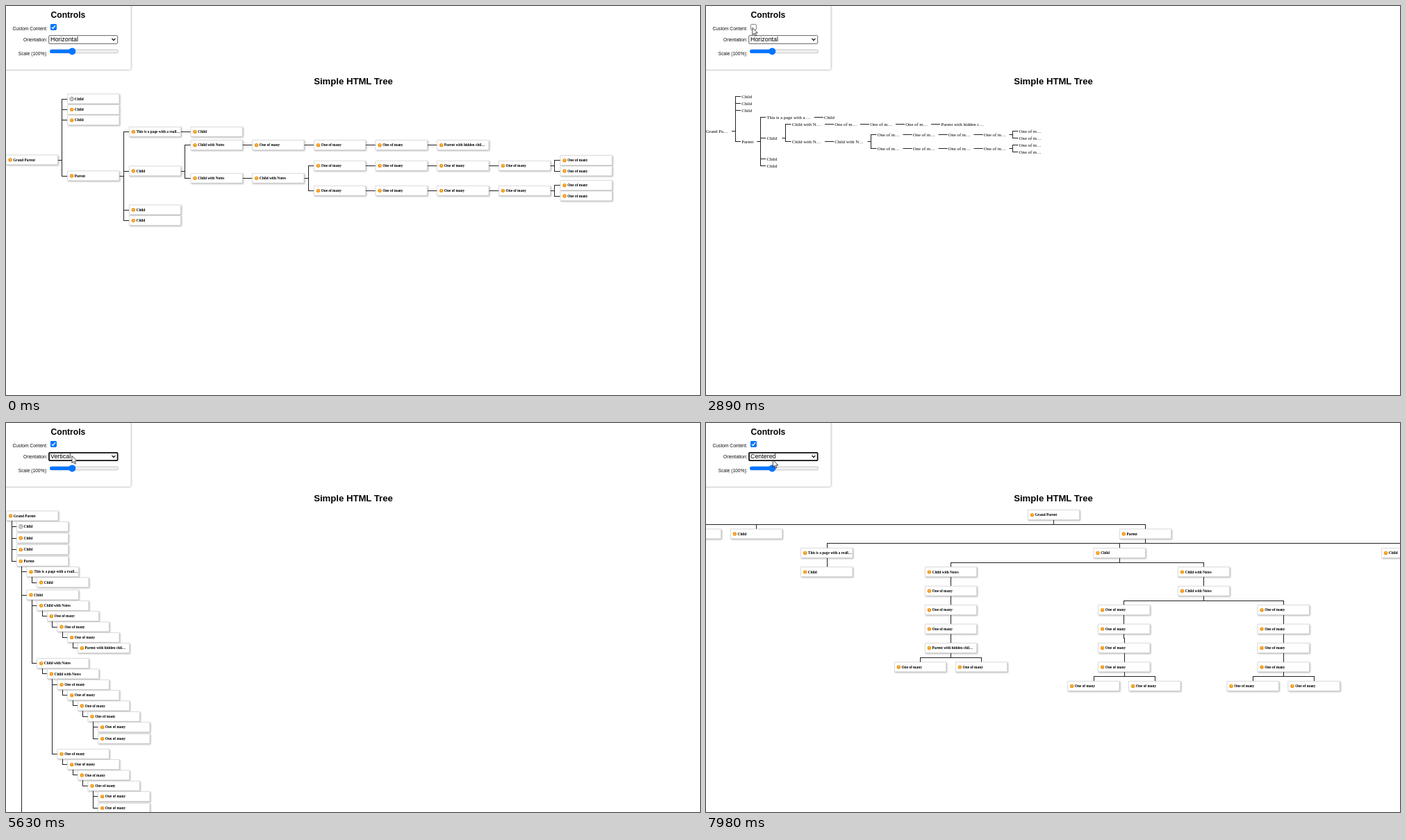
Recreate the animation shown at these times as an HTML page. Size 999 px wide and 561 px high, loop 8000 ms.

```html
<!DOCTYPE html>
<html lang="en">
<head>
<meta charset="utf-8">
<title>Simple HTML Tree</title>
<style>
  html, body { margin: 0; width: 100%; height: 100%; overflow: hidden; background: #fff; }
  svg { display: block; width: 999px; height: 561px; font-family: "Liberation Sans", Arial, sans-serif; }
  .tree { font-family: "Liberation Serif", Times, serif; }
  .tree .lines { fill: none; stroke: #222; stroke-width: 1; }
  .cards { fill: #fff; stroke: #d4d4d4; stroke-width: .7; filter: drop-shadow(1.8px 1.8px 1.3px rgba(0, 0, 0, .32)); }
  .boxed text { font-size: 5.33px; font-weight: bold; }
  .plain text { font-size: 6.67px; }
  .boxed .mark { font: bold 4px "Liberation Sans", Arial, sans-serif; text-anchor: middle; fill: #ffe9c4; }
  .boxed .help .mark { fill: #333; }
  .dot { fill: #f2960f; }
  .help .dot { fill: #fff; stroke: #444; stroke-width: .7; }
  .panel { fill: #fff; filter: drop-shadow(0 .7px 1.4px rgba(0, 0, 0, .45)); }
  .label { font-size: 6.67px; text-anchor: end; fill: #111; }
  .head { font-weight: bold; text-anchor: middle; }
  .field { font-size: 8.9px; }
  .pick rect { fill: #1967d2; }
  .pick text { fill: #fff; }
  #cursor { animation: move 8s infinite; }
  @keyframes move {
    0%, 4.25% { transform: translate(863px, 516px); animation-timing-function: cubic-bezier(.4, 0, .3, 1); }
    14.125%, 14.75% { transform: translate(70px, 34px); }
    17.625%, 39.625% { transform: translate(66.5px, 31px); }
    41.875%, 55.25% { transform: translate(97px, 48.5px); }
    57.5%, 66.1% { transform: translate(97px, 71.5px); }
    70.375%, 79.625% { transform: translate(94.5px, 47px); }
    83.5%, 94% { transform: translate(97px, 80px); }
    99.75%, 100% { transform: translate(96px, 53px); }
  }
</style>
</head>
<body>
<svg viewBox="0 0 999 561">
  <g id="trees"></g>
  <text class="head" x="500" y="112.7" font-size="13.15">Simple HTML Tree</text>

  <rect class="panel" x="-4" y="-4" width="183.7" height="95.7" rx="2"/>
  <text class="head" x="89.4" y="17.4" font-size="12.1">Controls</text>
  <text class="label" x="59.5" y="34.8">Custom Content:</text>
  <text class="label" x="59.5" y="51.3">Orientation:</text>
  <text class="label" x="59.5" y="71">Scale (100%):</text>

  <rect id="empty" x="64.4" y="26.4" width="8" height="8" rx="1.4" fill="#fff" stroke="#666" stroke-width=".8"/>
  <g id="checked">
    <rect x="64" y="26" width="8.8" height="8.8" rx="1.4" fill="#0075ff"/>
    <rect id="hover" x="64" y="26" width="8.8" height="8.8" rx="1.4" fill="#005cc8"/>
    <rect id="press" x="64" y="26" width="8.8" height="8.8" rx="1.4" fill="#3793ff"/>
    <path d="M65.8 30.6l1.8 1.9 3.4-4.3" fill="none" stroke="#fff" stroke-width="1.3"/>
  </g>

  <rect x="61.7" y="42.6" width="99" height="11.8" rx="1.2" fill="#fff" stroke="#555" stroke-width=".9"/>
  <rect id="ring" x="62" y="42.9" width="98.6" height="11.2" rx="1.2" fill="none" stroke="#101010" stroke-width="1.7"/>
  <path d="M152.4 46.9l2.5 2.6 2.5-2.6" fill="none" stroke="#111" stroke-width="1.3"/>
  <g class="field" id="values"></g>

  <rect x="63.4" y="63" width="98.2" height="4.8" rx="2.4" fill="#efefef" stroke="#b2b2b2" stroke-width=".7"/>
  <rect x="63" y="62.7" width="34" height="5.4" rx="2.7" fill="#0075ff"/>
  <circle cx="95.3" cy="65.4" r="5" fill="#0075ff"/>

  <g id="popup" class="field">
    <rect x="61.6" y="55" width="99.3" height="34.3" fill="#fff" stroke="#555" stroke-width=".9"/>
    <g id="options"></g>
  </g>

  <g id="cursor">
    <path d="M.3 .3V10.7L2.7 8.5 4.3 12.2 6 11.4 4.4 7.9H7.8Z" fill="#fff" stroke="#111" stroke-width=".8"/>
  </g>
</svg>

<script>
const $ = id => document.getElementById(id);
const LOOP = 8000;
const STEP = 44 / 3;          // indent and gap unit
const CARD = 74.67;

// Short form and column advance used by the plain view.
const plainForm = {
  'Grand Parent': ['Grand Pa…', 51.3],
  'Parent': ['Parent', 36.2],
  'Child': ['Child', 36.3],
  'This is a page with a reall…': ['This is a page with a …', 82.5],
  'Child with Notes': ['Child with N…', 61.5],
  'One of many': ['One of m…', 51],
  'Parent with hidden chil…': ['Parent with hidden c…', 60]
};

const node = (label, ...kids) => ({ label, kids });
const one = (...kids) => node('One of many', ...kids);
const child = (...kids) => node('Child', ...kids);
const notes = (...kids) => node('Child with Notes', ...kids);
const branch = () => one(one(one(one(one(), one()))));

function makeTree(showHidden) {
  const secret = showHidden ? [one(), one()] : [];
  return node('Grand Parent',
    { ...child(), help: true }, child(), child(),
    node('Parent',
      node('This is a page with a reall…', child()),
      child(
        notes(one(one(one(node('Parent with hidden chil…', ...secret))))),
        notes(notes(branch(), branch()))),
      child(), child()));
}

function walk(n, visit, depth = 0) {
  visit(n, depth);
  n.kids.forEach(k => walk(k, visit, depth + 1));
}

// Centres every node within the space taken by its subtree.
function spread(n, start, leaf, pad) {
  let end = start + pad / 2;
  n.kids.forEach(k => end += spread(k, end, leaf, pad));
  const size = n.kids.length ? end - start + pad / 2 : leaf;
  n.mid = start + size / 2;
  return size;
}

const snap = v => Math.floor(v) + .5;
const hLine = (x1, x2, y) => `M${x1} ${snap(y)}H${x2}`;
const vLine = (x, y1, y2) => `M${snap(x)} ${y1}V${y2}`;
const last = list => list[list.length - 1];

function sideLines(n, from, bar, to) {
  const k = n.kids;
  return hLine(from, k.length > 1 ? bar : to, n.y)
    + (k.length > 1 ? vLine(bar, snap(k[0].y) - .5, snap(last(k).y) + .5) : '')
    + k.map(c => hLine(bar, to, c.y)).join('');
}

function draw(id, tree, join, boxed) {
  let lines = '', cards = '', texts = '';
  walk(tree, n => {
    if (n.kids.length) lines += join(n);
    if (!boxed) {
      texts += `<text x="${n.x}" y="${n.y + 2.2}">${plainForm[n.label][0]}</text>`;
      return;
    }
    cards += `<rect x="${n.x}" y="${n.y - 7}" width="${CARD - .4}" height="13.8"/>`;
    texts += `<g class="${n.help ? 'help' : ''}">
      <circle class="dot" cx="${n.x + 6}" cy="${n.y}" r="2.7"/>
      <text class="mark" x="${n.x + 6}" y="${n.y + 1.5}">?</text>
      <text x="${n.x + 10.2}" y="${n.y + 1.7}">${n.label}</text></g>`;
  });
  $('trees').innerHTML += `<g id="${id}" class="tree ${boxed ? 'boxed' : 'plain'}">
    <path class="lines" d="${lines}"/><g class="cards">${cards}</g>${texts}</g>`;
}

function horizontal() {
  const tree = makeTree();
  spread(tree, 125.67, 46 / 3, 4 / 3);
  walk(tree, (n, d) => { n.x = 266 / 3 * d; n.y = n.mid; });
  draw('horizontal', tree, n => sideLines(n, n.x + CARD, n.x + 80.5, n.x + 88.67), true);
}

function plain() {
  const tree = makeTree();
  spread(tree, 125.5, 10, 0);
  tree.x = 0;
  walk(tree, n => {
    n.y = n.mid;
    n.next = n.x + plainForm[n.label][1];
    n.kids.forEach(k => k.x = n.next);
  });
  draw('plain', tree, n => sideLines(n, n.next - 14.3, n.next - 9, n.next - 1.4));
}

function vertical() {
  const tree = makeTree();
  let y = 134;
  (function stack(n, d) {
    n.x = .67 + STEP * d;
    n.y = y;
    y += 46 / 3;
    n.kids.forEach(k => stack(k, d + 1));
    y += 4 / 3;
  })(tree, 0);
  draw('vertical', tree, n => vLine(n.x + 7.4, n.y + 7, snap(last(n.kids).y) + .5)
    + n.kids.map(k => hLine(n.x + 7.4, k.x, k.y)).join(''), true);
}

function centered() {
  const tree = makeTree(true);
  spread(tree, -154, 88, 40 / 3);
  walk(tree, (n, d) => { n.x = n.mid - CARD / 2; n.y = 132.6 + 27.42 * d; });
  draw('centered', tree, n => {
    const k = n.kids, bar = n.y + 13.8;
    return vLine(n.mid, n.y + 7, bar)
      + hLine(snap(k[0].mid) - .5, snap(last(k).mid) + .5, bar)
      + k.map(c => vLine(c.mid, bar, c.y - 7)).join('');
  }, true);
}

const names = ['Horizontal', 'Vertical', 'Centered'];
names.forEach((name, i) => {
  const top = 55.4 + 11.2 * i;
  const text = `<text x="64.8" y="${top + 8.5}">${name}</text>`;
  $('values').innerHTML += `<text id="value${i}" x="64" y="51.4">${name}</text>`;
  $('options').innerHTML += `${text}<g id="pick${i}" class="pick">
    <rect x="62" y="${top}" width="98.5" height="11.1"/>${text}</g>`;
});

horizontal();
plain();
vertical();
centered();

// Shows an element only during the given [from, to] spans, in ms.
const css = document.head.appendChild(document.createElement('style'));
function during(id, ...spans) {
  const key = (ms, o) => `${ms / LOOP * 100}%{opacity:${o}}`;
  const keys = spans.map(([a, b]) => key(a, 1) + key(b, 0)).join('');
  css.textContent += `@keyframes on-${id}{${key(0, 0)}${keys}}
    #${id}{animation:on-${id} ${LOOP}ms step-end infinite}\n`;
}

during('horizontal', [0, 1690], [3020, 5240]);
during('plain', [1690, 3020]);
during('vertical', [5240, 7520]);
during('centered', [7520, LOOP]);
during('checked', [0, 1690], [3020, LOOP]);
during('hover', [1130, 1690], [3020, 3200]);
during('press', [1650, 1690]);
during('value0', [0, 5240]);
during('value1', [5240, 7520]);
during('value2', [7520, LOOP]);
during('ring', [5240, 6090], [7520, LOOP]);
during('popup', [4140, 5190], [6140, 7470]);
during('pick0', [4140, 4530], [6440, 6480]);
during('pick1', [4530, 5190], [6140, 6440], [6480, 6570]);
during('pick2', [6570, 7470]);

// The pointer both moves and appears, so its two animations share one rule.
css.textContent += `@keyframes appear{0%{opacity:0}${340 / LOOP * 100}%{opacity:1}100%{opacity:1}}
  #cursor{animation:move ${LOOP}ms infinite,appear ${LOOP}ms step-end infinite}`;
</script>
</body>
</html>
```
